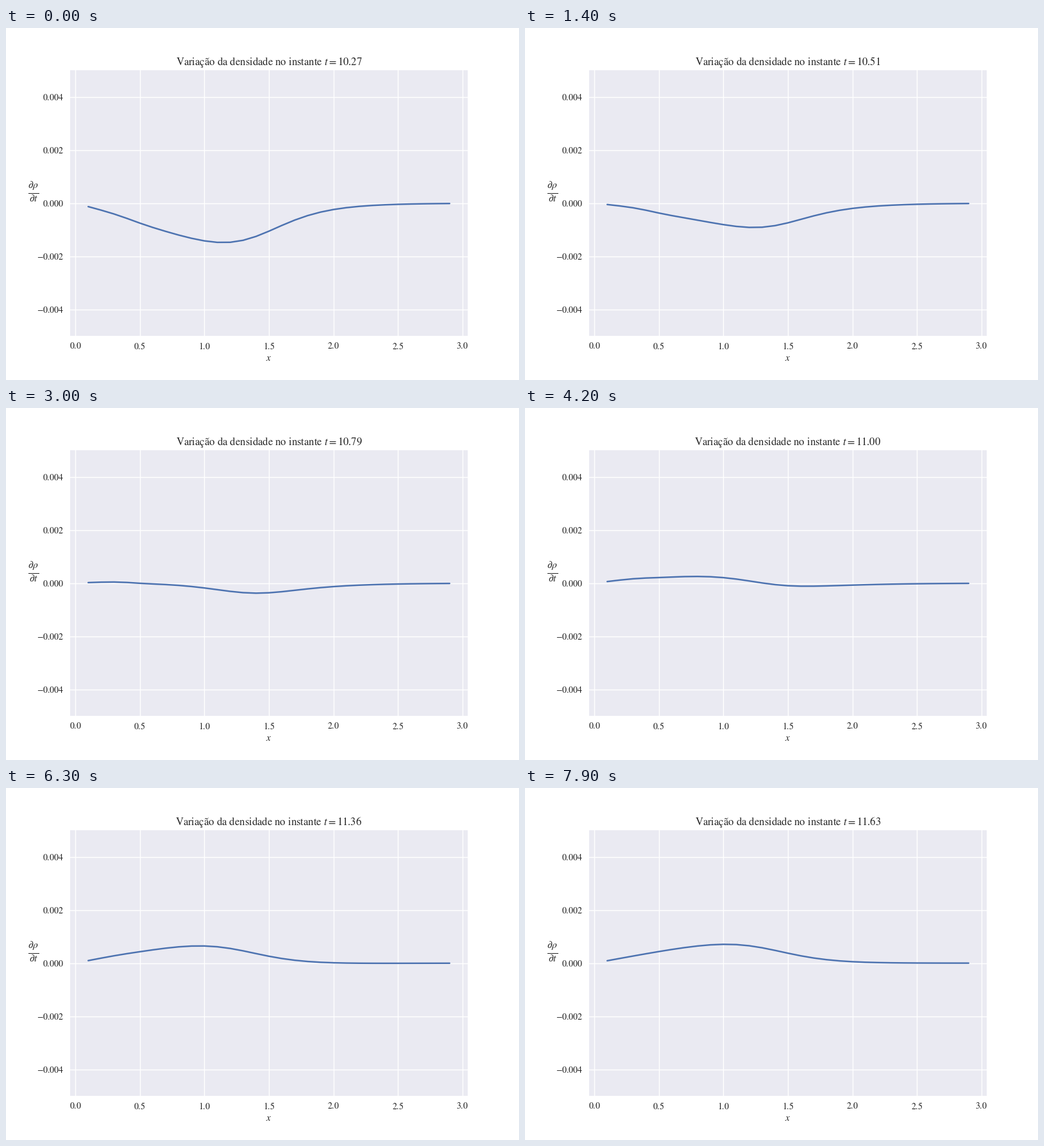
A matplotlib script that plays this animation: 800 by 550 pixels, repeating every 8000 ms.

```python
import matplotlib.pyplot as plt
import numpy as np
from matplotlib.animation import FuncAnimation

FRAMES, INTERVAL = 80, 100
T0, DT = 10.27365, 0.01723
INK = "0.15"

plt.rcParams.update({
    "font.family": "Liberation Serif",
    "mathtext.fontset": "stix",
    "text.color": INK,
    "axes.labelcolor": INK,
    "axes.labelsize": 11,
    "axes.titlesize": 12,
})


def hump(x, rise, edge, steep, skew):
    """Linear rise from zero, cut off by a logistic edge."""
    d = x - edge
    return rise * x / (1 + np.exp(d * (steep + skew * d)))


x = np.linspace(0.1, 2.9, 29)
SINK = hump(x, 1.541e-3, 1.465, 4.98, -0.687) * (1 - 0.15 * np.exp(-(x / 0.42)**4))
SOURCE = hump(x, 0.903e-3, 1.293, 4.55, 0.55)


def rate(k):
    """The sink fades out while the source swells and then settles."""
    u = k / (FRAMES - 1)
    sink = (1 - u) * (1 + 1.70 * u - 1.63 * u**2)
    source = u * (6.41 - 7.145 * u + 1.735 * u**2)
    return source * SOURCE - sink * SINK


def upright(s):
    return r"\mathrm{" + s.replace(" ", r"\hspace{0.346}") + "}"


def tick_labels(values, digits):
    return [f"${upright(f'{v:.{digits}f}')}$" for v in values]


def title_at(k):
    head = upright("Variação da densidade no instante ")
    return f"${head}t={T0 + DT * k:.2f}$"


fig = plt.figure(figsize=(8, 5.5), dpi=100, facecolor="white")
fig.subplots_adjust(left=0.125, right=0.9, bottom=0.125, top=0.88)
ax = fig.add_subplot(facecolor="#EAEAF2")
ax.set_axisbelow(True)
ax.grid(color="white", linewidth=1, linestyle="-")
ax.spines[:].set_visible(False)
ax.tick_params(length=0, pad=7, labelsize=10, labelcolor=INK)
ax.tick_params(axis="x", pad=6)

xticks = [0, 0.5, 1, 1.5, 2, 2.5, 3]
yticks = [-0.004, -0.002, 0, 0.002, 0.004]
ax.set_xticks(xticks, tick_labels(xticks, 1))
ax.set_yticks(yticks, tick_labels(yticks, 3))
ax.set_xlim(-0.04, 3.04)
ax.set_ylim(-0.005, 0.005)
ax.set_xlabel("$x$")
ax.set_ylabel(r"$\frac{\partial \rho}{\partial t}$", rotation=0, fontsize=16)

title = ax.set_title(title_at(0))
line, = ax.plot(x, rate(0), color="#4C72B0", linewidth=1.75,
                solid_capstyle="round")


def update(k):
    line.set_ydata(rate(k))
    title.set_text(title_at(k))
    return line, title


anim = FuncAnimation(fig, update, frames=FRAMES, interval=INTERVAL,
                     repeat=True, repeat_delay=0, blit=False)
plt.show()
```
